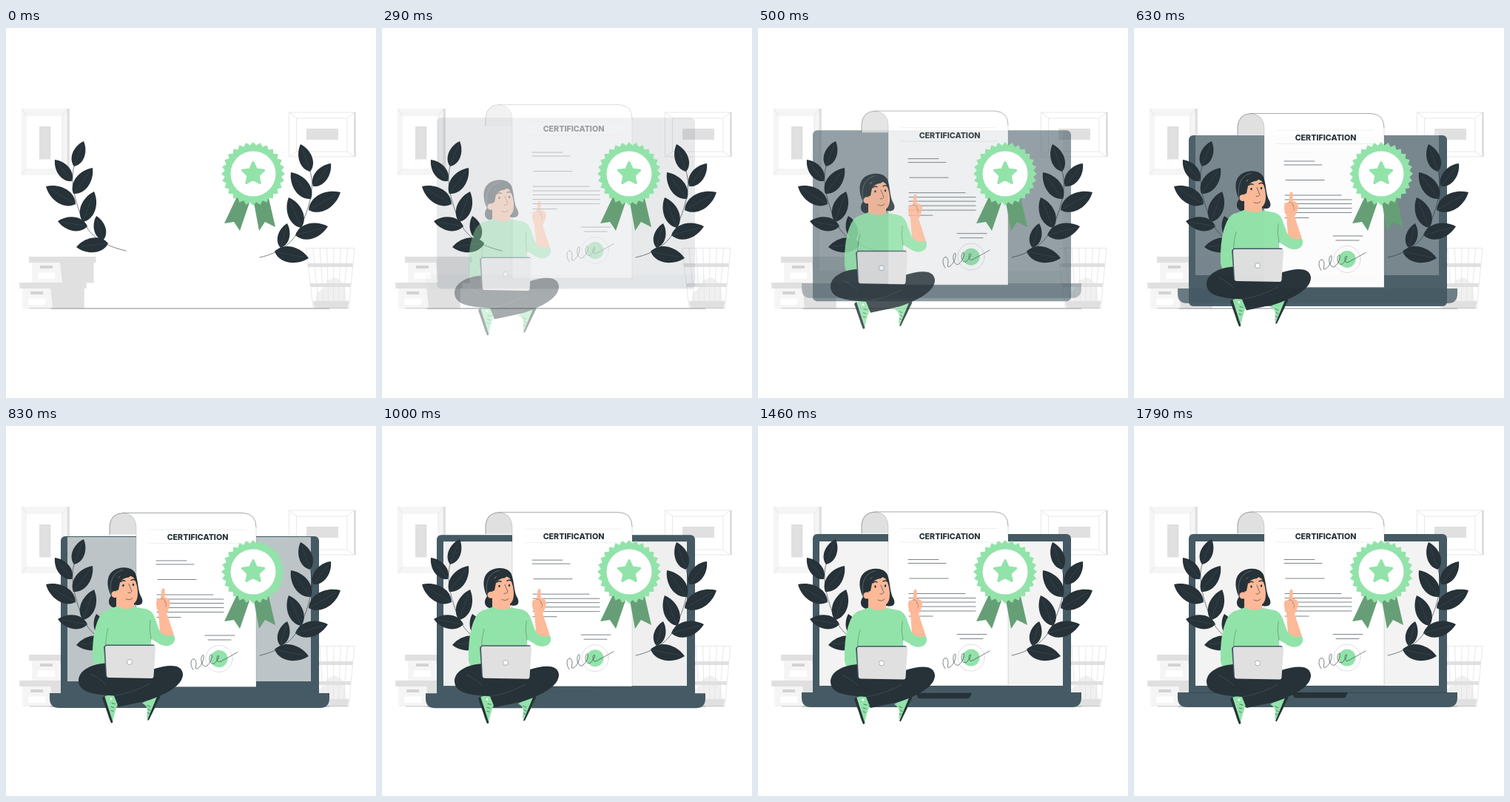
Write an HTML page that moves like this. It is 500 px wide and 500 px high and loops after 1.83 s.

```html
<!DOCTYPE html>
<html lang="en">
<head>
<meta charset="utf-8">
<style>
html, body { margin: 0; width: 100%; height: 100%; overflow: hidden; background: #fff; }
svg { display: block; width: 100vw; height: 100vh; }
.dark { fill: #263238; }
.slate { fill: #455a64; }
.green { fill: #92e3a9; }
.skin { fill: #fdb998; }
.g1 { fill: #f5f5f5; }
.g2 { fill: #e0e0e0; }
.white { fill: #fff; }
.line { fill: none; stroke: #263238; stroke-width: .6; stroke-linecap: round; stroke-linejoin: round; }
.pale { fill: none; stroke: #e3e3e3; stroke-width: .8; }
</style>
</head>
<body>
<svg viewBox="0 0 500 500">
  <!-- room -->
  <path class="g1" d="M21 109H84V199H21Z"/>
  <path class="g2" d="M82.500 109H86V195L82.500 199Z"/>
  <path class="white" d="M28 119H76V190H28Z"/>
  <path class="pale" d="M21 109L28 119M83 109L76 119V190L83 199M21 199L28 190"/>
  <path class="g2" d="M45 133H60.500V177.500H45Z"/>

  <path class="pale" d="M382.500 114H472V174H382.500ZM392.500 122H461V167H392.500ZM382.500 114L392.500 122M470 114L461 122M382.500 174L392.500 167M470 174L461 167"/>
  <path class="g2" d="M470 114H473V174H470ZM406 136H449V151H406Z"/>

  <g id="box">
    <path class="g1" d="M35 317H76V344.500H35Z"/>
    <path class="g2" d="M31 309H121.500V317H31ZM73 317H118.500V344.500H76Z"/>
    <path fill="#d2d2d2" d="M46 321H63V325H46Z"/>
    <path class="white" d="M43 330.500H66V339H43Z"/>
  </g>
  <use href="#box" x="-12.800" y="35"/>

  <path fill="#f0f0f0" d="M418 369L420 358L429 352L434 341L445 337L457 345L460 369Z"/>
  <path class="pale" d="M405.500 297.500H471L463 378H415Z"/>
  <g id="wires" class="pale"></g>
  <path class="g2" d="M407 318H469L468.500 323H408ZM411 345H466L465.500 350H411.500ZM415 369H463.500L462 376Q461 379 457 379H421Q417 379 416 375Z"/>
  <path d="M32 378.700H463" stroke="#bbb" stroke-width=".8"/>
  <path d="M60 379.200H437" stroke="#8a9296" stroke-width=".7"/>

  <!-- big laptop -->
  <rect id="lid" class="slate" x="74" y="146" width="349" height="231" rx="6"/>
  <rect id="screen" fill="#f3f3f3" x="83" y="156" width="329" height="195"/>
  <path id="base" class="slate" d="M59 360H437V367Q437 380 424 380H72Q59 380 59 367Z"/>
  <path id="notch" class="dark" d="M213 360H289L286 366Q285 367.500 283 367.500H219Q217 367.500 216 366Z"/>
  <path id="hinge" class="line" d="M74 360.300H423"/>

  <!-- certificate -->
  <g id="cert">
    <path class="white" d="M158 116H320Q338 116 338 135V351H176V135Q175 116 158 116Z"/>
    <path class="g2" d="M140 145V134Q141 117 158 116Q175 117 176 135V145Z"/>
    <path class="line" d="M140 145V134Q141 117 158 116H320Q338 117 338 135" stroke-opacity=".7"/>
    <path class="line" d="M338 135V351H176V135Q175 117 158 116" stroke-opacity=".25"/>
    <path class="line" d="M193 138.500H323M193 157H323" stroke-opacity=".13"/>
    <text x="259" y="152.700" text-anchor="middle" class="dark" textLength-off font-family="Montserrat, Inter, sans-serif" font-weight="800" font-size="10.700">CERTIFICATION</text>
    <path class="line" d="M203 180.500H244M203 185.500H254M205 206H257M204 226.500H280M204 232.500H294M204 238H294M204 244H294M204 250H294M204 257H236M269 281.500H309M273 287.500H304"/>
    <circle class="green" cx="288" cy="313" r="11.500"/>
    <circle class="line" cx="288" cy="313" r="18" stroke-opacity=".25"/>
    <path class="line" d="M253 328C247 320 251 311 255 314C260 319 253 329 259 326C266 322 269 308 266 308C261 312 265 326 271 323C278 318 280 307 277 307C272 313 277 323 282 319C288 313 289 308 286 309C283 316 287 320 293 315C301 311 306 308 313 304"/>
  </g>

  <g id="leaves"></g>

  <!-- badge -->
  <path fill="#669f76" d="M312 228L295 264L308 262L316 274L329 236ZM335 236L342 274L350 262L364 269L355 230Z"/>
  <path id="rosette" class="green"/>
  <circle class="white" cx="334" cy="197" r="30.500"/>
  <path id="star" class="green" stroke="#92e3a9" stroke-width="3" stroke-linejoin="round"/>

  <!-- woman -->
  <g id="woman">
    <path class="dark" d="M146 247C138 245 137 237 142 231C136 219 135 204 145 197C156 190 171 192 175 201C179 212 178 225 183 233C187 241 182 245 175 243Z"/>
    <path class="skin" d="M149 230V247Q160 253 173 247V234Z"/>
    <path class="skin" d="M152 206Q160 199 172 206C176 211 178 220 178 228C178 238 173 244 165 244C155 243 149 236 149 222Z"/>
    <path class="dark" d="M148 224C147 208 155 198 171 202L166 206Q157 207 154 213L152 223Z"/>
    <circle class="skin" cx="147" cy="229" r="4.500"/>
    <path class="line" d="M142 230C139 212 144 199 158 196" style="stroke:#78858b"/>
    <path class="line" d="M155 212Q158 209 161 211M169 210Q172 208 175 210" style="stroke-width:1.400"/>
    <path class="line" d="M166 215L170 225Q168 228 165 227M162 235Q167 238 171 234"/>
    <ellipse class="dark" cx="158.500" cy="217" rx="1.200" ry="1.700"/>
    <ellipse class="dark" cx="172" cy="216" rx="1.200" ry="1.700"/>

    <path class="skin" d="M209 235L210.500 223Q212 219 214.500 222L214.500 233Q222 234 222 241Q220 250 217 254L225 278Q230 290 220 294Q210 290 208 280L206 253Q201 243 204 236Z"/>
    <path class="line" d="M209 235Q215 234 215 240M215 239Q218 242 216 246" stroke-opacity=".5"/>
    <path class="green" d="M140 249L150 245Q162 252 174 246L185 248Q196 249 200 258L207 277Q213 288 227 284Q230 291 225 296Q218 301 209 297L196 289L198 340L132 333Q119 330 117 318Q116 280 126 260Q131 250 140 249Z"/>
    <path class="line" d="M195 264Q193 277 196 290M138 275Q134 289 135 300" stroke-opacity=".55"/>

    <path class="green" d="M133 367L145 363L151 377Q146 390 144 402Q140 401 138 394Z"/>
    <path class="dark" d="M130 369L133 366L144.500 402L142 403Z"/>
    <path class="green" d="M184 376L204 365L207 369Q203 380 192 398Q189 395 191 389Q192 380 184 376Z"/>
    <path class="dark" d="M205 365L208.500 367L193 399L191 399Z"/>
    <path class="line" d="M143 376L147 377M142 381L146 382M142 386L145 387M191 379L195 381M192 384L195 386M191 389L194 390"/>
    <circle class="white" cx="142" cy="370" r="1.500"/>
    <path class="dark" d="M134 322C112 324 98 333 98 346C99 359 112 363 132 365L146 366L152 381L190 373C215 365 240 352 239 336C237 322 218 324 199 330Z"/>
    <path class="line" d="M146 366Q168 363 194 350M115 337Q126 342 135 351" style="stroke:#455a64"/>

    <path class="slate" d="M135 297H200L201 300L136 303L138 342L135 340L132 300Z"/>
    <path class="g2" d="M136 298.500H200Q202 298.500 202 301L199.500 340Q199 342.500 197 342.500L139 341.500Q136.500 341.500 136 339L134 301Q134 298.500 136 298.500Z"/>
    <circle cx="167" cy="320.500" r="3.500" fill="#fff" stroke="#8a9296" stroke-width=".7"/>
  </g>
</svg>
<script>
const LOOP = 1830;
const $ = id => document.getElementById(id);

// Leaves: base x, base y, tip x, tip y
const leftLeaves = [92,187,105,153, 89,207,66,178, 91,224,117,189, 94,238,54,214,
  104,262,119,221, 110,268,70,261, 131,287,122,254, 138,291,95,296];
const rightLeaves = [411,194,398,157, 415,214,439,183, 412,231,385,195, 409,246,452,222,
  399,270,382,229, 391,280,435,268, 371,297,380,264, 363,302,409,311];

function leaf(x, y, tx, ty) {
  const u = tx - x, v = ty - y;
  const at = (k, h) => `${x + u * k - v * h} ${y + v * k + u * h}`;
  return `<path class="dark" d="M${x} ${y}C${at(.2, .32)} ${at(.7, .29)} ${tx} ${ty}C${at(.7, -.29)} ${at(.2, -.32)} ${x} ${y}"/>` +
    `<path class="line" style="stroke:#455a64;stroke-width:.4" d="M${x} ${y}L${at(.85, 0)}"/>`;
}

function branch(list, stem) {
  let out = `<path class="line" d="${stem}"/>`;
  for (let i = 0; i < list.length; i += 4) out += leaf(...list.slice(i, i + 4));
  return out;
}

$('leaves').innerHTML =
  branch(leftLeaves, 'M92 187C86 207 94 238 105 262C114 282 134 295 162 301') +
  branch(rightLeaves, 'M411 194C418 215 409 246 397 271C388 290 370 304 343 310');

// Ring of points with alternating radii
function spikes(cx, cy, count, outer, inner) {
  let d = '';
  for (let i = 0; i < count * 2; i++) {
    const a = i * Math.PI / count - Math.PI / 2, r = i % 2 ? inner : outer;
    d += `${i ? 'L' : 'M'}${cx + r * Math.cos(a)} ${cy + r * Math.sin(a)}`;
  }
  return d + 'Z';
}
$('rosette').setAttribute('d', spikes(334, 197, 28, 43, 38.5));
$('star').setAttribute('d', spikes(334, 197, 5, 15.5, 7.5));

let wires = '';
for (let i = 1; i < 7; i++) wires += `M${405.5 + i * 9.35} 297.5L${415 + i * 6.86} 369`;
$('wires').innerHTML = `<path d="${wires}"/>`;

// Smooth curve through [time, value] keys, flat at both ends
function track(t, keys) {
  const last = keys.length - 1;
  if (t <= keys[0][0]) return keys[0][1];
  if (t >= keys[last][0]) return keys[last][1];
  const i = keys.findIndex(k => k[0] > t) - 1;
  const slope = j => {
    if (j <= 0 || j >= last) return 0;
    const a = (keys[j][1] - keys[j - 1][1]) / (keys[j][0] - keys[j - 1][0]);
    const b = (keys[j + 1][1] - keys[j][1]) / (keys[j + 1][0] - keys[j][0]);
    return a * b > 0 ? 2 * a * b / (a + b) : 0;
  };
  const [t0, v0] = keys[i], [t1, v1] = keys[i + 1];
  const w = t1 - t0, s = (t - t0) / w, q = 1 - s;
  return v0 * (1 + 2 * s) * q * q + v1 * s * s * (3 - 2 * s) +
    w * s * q * (slope(i) * q - slope(i + 1) * s);
}

const slide = [[40, 0], [290, .17], [500, .74], [630, .965], [830, 1.1], [1150, 1]];
const certFade = [[20, 0], [290, .4], [500, .83], [630, .98], [720, 1]];
const lidFade = [[60, 0], [290, .13], [500, .6], [630, .96], [720, 1]];
const baseFade = [[200, 0], [290, .03], [500, .36], [630, .75], [800, 1]];
const baseShift = [[200, -29], [290, -27], [500, -15], [630, -8], [830, 1], [920, 1.5], [1170, 0]];
const screenFade = [[360, 0], [500, .05], [630, .26], [830, .69], [1050, 1]];
const screenShift = [[360, -28], [500, -23], [630, -17], [830, -6], [1060, .8], [1360, 0]];
const notchFade = [[820, 0], [1000, .4], [1170, .93], [1280, 1]];
const notchShift = [[820, -28], [1000, -15], [1170, -2], [1340, 1.2], [1660, 0]];

function pose(id, alpha, dy) {
  $(id).setAttribute('opacity', alpha);
  $(id).setAttribute('transform', `translate(0 ${dy})`);
}

function draw(t) {
  const on = t >= 80 ? 1 : 0;
  const rest = 1 - track(t, slide);
  const fade = on * track(t, certFade);
  pose('cert', fade, -15 * rest);
  pose('woman', fade, 15 * rest);
  pose('lid', on * track(t, lidFade), -30 * rest);
  pose('screen', track(t, screenFade), track(t, screenShift));
  pose('base', track(t, baseFade), track(t, baseShift));
  pose('notch', track(t, notchFade), track(t, notchShift));
  pose('hinge', t < 1750 ? 0 : t < 1790 ? .4 : .7, 0);
}

const start = performance.now();
function tick() {
  draw((performance.now() - start) % LOOP);
  requestAnimationFrame(tick);
}
draw(0);
requestAnimationFrame(tick);
</script>
</body>
</html>
```
